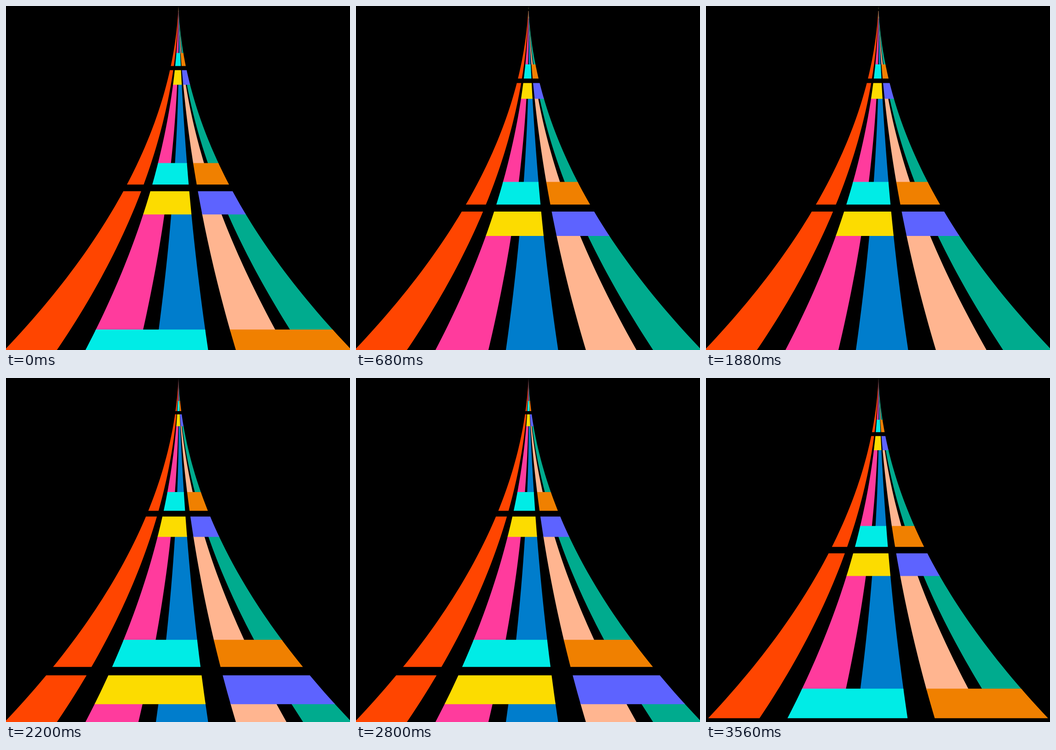
Write an HTML page that moves like this. It is 748 by 748 pixels and loops after 3600 ms.

```html
<!DOCTYPE html>
<html lang="en">
<head>
<meta charset="utf-8">
<title>Ribbon road</title>
<style>
  html, body { margin: 0; width: 100%; height: 100%; overflow: hidden; background: #000; }
  svg { display: block; width: 748px; height: 748px; }
</style>
</head>
<body>
<svg id="stage" viewBox="0 0 748 748"></svg>
<script>
const PERIOD = 600, STEP = 40;   // ms per repeat, ms per drawn step
const SPAN = 2.897;              // repeats between apex and bottom edge
const APEX = 0.968;              // apex distance above repeat 0
const MID = 374.3, DRIFT = 0.7;  // centre line, and its offset at the apex
const GAP = 0.0225, BAND = 0.1735, LAP = 0.008;

// Lane edges: offset from the centre at the bottom, sideways bow, bow power
const edges = [
  [-377, -11, 3],
  [-263.3, 11, 1.5],
  [-201.3, 14, 1.5],
  [-86.3, 22, 1.5],
  [-48.3, 22, 1.5],
  [65.2, 20, 1.5],
  [125.4, 23, 2],
  [235.4, 42, 5],
  [271.4, 42, 5],
  [377, 0, 1]
];

// [colour, left edge, right edge, start, end] within one repeat
const parts = [
  ['#ff4500', 0, 1, GAP, 1 - GAP],
  ['#ff3b9d', 2, 3, BAND - LAP, 1 - BAND + LAP],
  ['#007dcc', 4, 5, BAND - LAP, 1 - BAND + LAP],
  ['#ffb590', 6, 7, BAND - LAP, 1 - BAND + LAP],
  ['#00ab8e', 8, 9, BAND - LAP, 1 - BAND + LAP],
  ['#fcdc00', 2, 5, GAP, BAND],
  ['#5d63ff', 6, 9, GAP, BAND],
  ['#00ece6', 2, 5, 1 - BAND, 1 - GAP],
  ['#f08000', 6, 9, 1 - BAND, 1 - GAP]
];

const stage = document.getElementById('stage');
const paths = parts.map(([fill]) => {
  const p = document.createElementNS('http://www.w3.org/2000/svg', 'path');
  p.setAttribute('fill', fill);
  return stage.appendChild(p);
});

// Curved road: s counts repeats down from the apex
function point([offset, bow, power], s) {
  const t = s / SPAN;
  const spread = t * (0.025 + t * (0.143 + t * (0.427 + t * 0.405)));
  const lean = (bow * t ** power + DRIFT) * (1 - t);
  const x = MID + offset * spread + lean;
  const y = 79.9 * s + 61.5 * s * s;
  return x.toFixed(2) + ' ' + y.toFixed(2);
}

function strip(left, right, from, to) {
  const a = Math.max(0, from), b = Math.min(SPAN + 0.15, to);
  if (b <= a) return '';
  const n = Math.max(2, Math.ceil((b - a) * 30));
  const l = [], r = [];
  for (let i = 0; i <= n; i++) {
    const s = a + (b - a) * i / n;
    l.push(point(edges[left], s));
    r.unshift(point(edges[right], s));
  }
  return 'M' + l.concat(r).join('L') + 'Z';
}

function draw(ms) {
  const phase = Math.floor(ms / STEP) * STEP % PERIOD / PERIOD;
  parts.forEach(([, left, right, from, to], i) => {
    let d = '';
    for (let k = -3; k < 3; k++) {
      const base = APEX + phase + k;
      d += strip(left, right, base + from, base + to);
    }
    paths[i].setAttribute('d', d);
  });
}

const start = performance.now();
function tick() {
  draw(performance.now() - start);
  requestAnimationFrame(tick);
}
tick();
</script>
</body>
</html>
```
